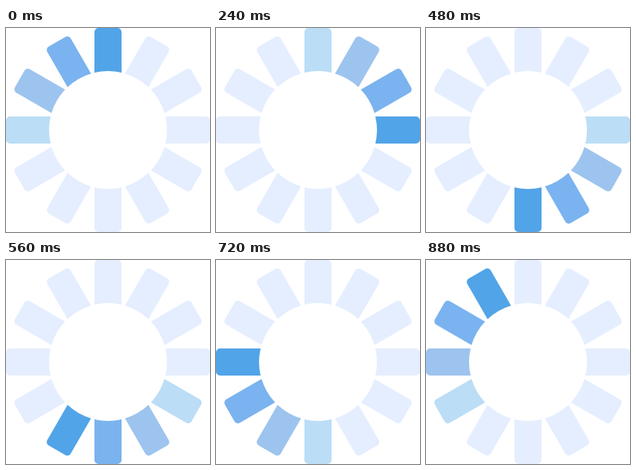
These frames come from a looping animation (256x256 px, 960 ms). An HTML page:

```html
<!DOCTYPE html>
<html lang="en">
<head>
<meta charset="utf-8">
<title>Loading spinner</title>
<style>
  html, body {
    margin: 0;
    width: 100%;
    height: 100%;
    overflow: hidden;
    background: #fff;
  }
  svg {
    display: block;
    width: 100vw;
    height: 100vh;
  }
  use {
    fill: #e5eeff;
    transform: rotate(calc(var(--i) * 30deg));
    animation: fade 960ms step-end infinite;
    /* 1 ms early, so each step has landed on its mark */
    animation-delay: calc(var(--i) * 80ms - 961ms);
  }
  @keyframes fade {
    0% { fill: #51a4e7; }
    8.3333% { fill: #7ab3ef; }
    16.6666% { fill: #9dc4ee; }
    25% { fill: #bbddf6; }
    33.3333%, 100% { fill: #e5eeff; }
  }
</style>
</head>
<body>
<svg viewBox="-128 -128 256 256">
  <defs>
    <path id="bar" d="M-17-72V-123a5 5 0 0 1 5-5H12a5 5 0 0 1 5 5V-72A74 74 0 0 0-17-72Z"/>
  </defs>
  <use href="#bar" style="--i:0"/>
  <use href="#bar" style="--i:1"/>
  <use href="#bar" style="--i:2"/>
  <use href="#bar" style="--i:3"/>
  <use href="#bar" style="--i:4"/>
  <use href="#bar" style="--i:5"/>
  <use href="#bar" style="--i:6"/>
  <use href="#bar" style="--i:7"/>
  <use href="#bar" style="--i:8"/>
  <use href="#bar" style="--i:9"/>
  <use href="#bar" style="--i:10"/>
  <use href="#bar" style="--i:11"/>
</svg>
</body>
</html>
```
